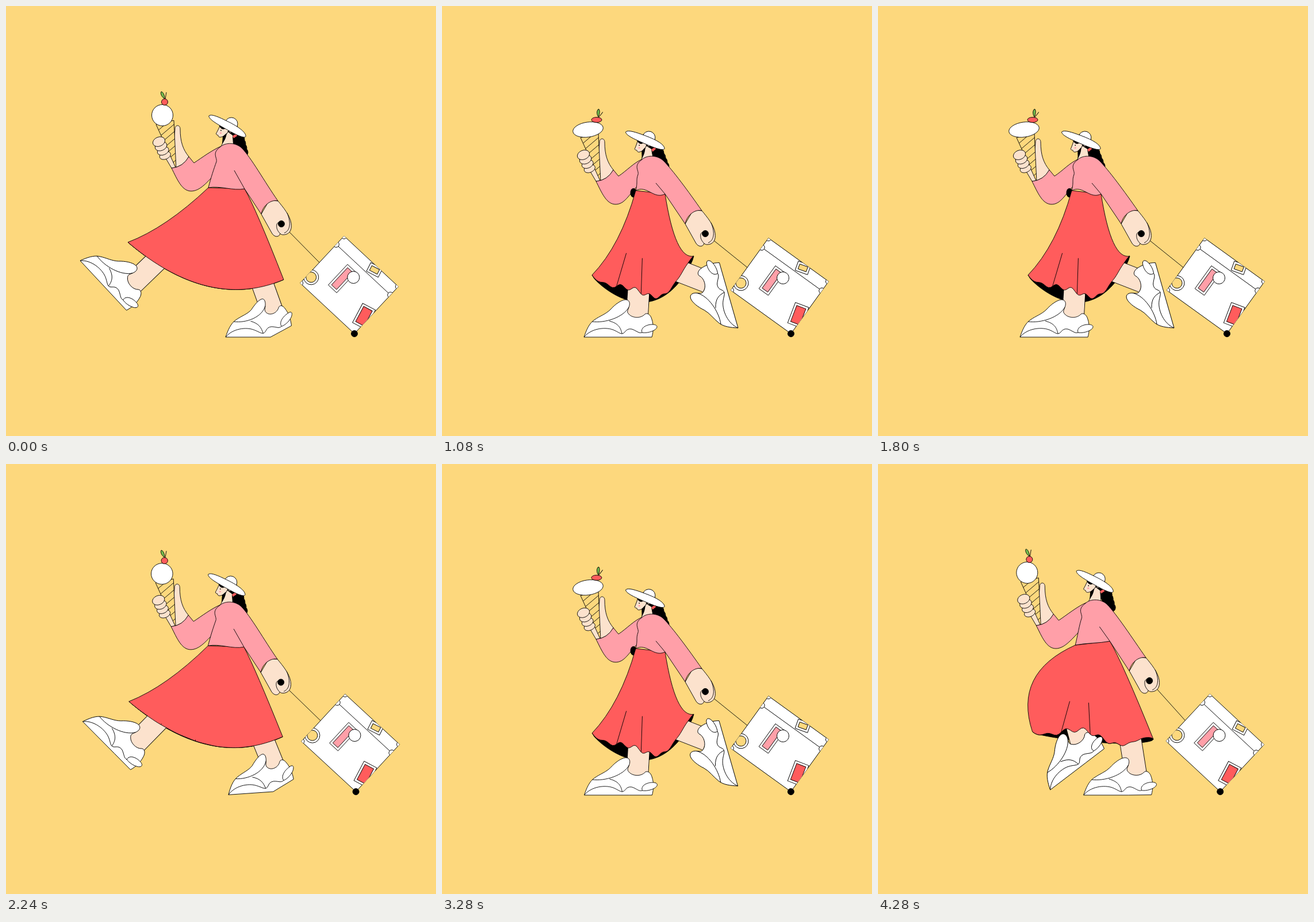
An HTML page with a canvas that plays this animation: 748 by 748 pixels, repeating every 4320 ms.

```html
<!DOCTYPE html>
<html lang="en">
<head>
<meta charset="utf-8">
<title>Walk with a suitcase</title>
<style>
html, body { margin: 0; width: 100%; height: 100%; overflow: hidden; background: #fdd87d; }
canvas { display: block; width: 100vw; height: 100vh; }
</style>
</head>
<body>
<canvas id="stage" width="748" height="748"></canvas>
<script>
const ctx = document.getElementById('stage').getContext('2d');
const YELLOW = '#fdd87d', PINK = '#ff9fa8', RED = '#ff5c5c', SKIN = '#fce2cd',
      WHITE = '#fff', BLACK = '#000', GREEN = '#74bf4d';
const LOOP = 4320, FRAME = 40, STEP = 18, LINE = 0.9;

// Four poses of one step. Body parts hold offsets from the contact pose,
// feet hold toe x, toe y, angle and heel bend.
const contact = {
  head: [0, 0], chest: [0, 0], cup: [0, 0], hand: [0, 0], caseX: 0, tilt: 0, squash: 0,
  waist: [[352, 316], [415, 318]], sides: [[278, 386], [435, 353]],
  hem: [[212, 411], [353, 531], [483, 476]], ripple: 0, phase: 0.65, depth: 0,
  lead: [129, 443, 47, 0], trail: [382, 576, 0, 20]
};
const down = {
  head: [-29, 24], chest: [-25, 22], cup: [-20, 23], hand: [-21, 17], caseX: 1, tilt: -7.2, squash: 1,
  waist: [[337, 321], [388, 327]], sides: [[311, 416], [406, 442]],
  hem: [[261, 468], [372, 551], [438, 435]], ripple: 11, phase: 0.65, depth: 13,
  lead: [247, 576, 0, 0], trail: [515, 560, -106, 0]
};
const pass = {
  head: [-25, -3], chest: [-16, -3], cup: [-21, -1], hand: [-16, 0], caseX: -16, tilt: 0, squash: 0,
  waist: [[341, 320], [396, 313]], sides: [[252, 414], [414, 360]],
  hem: [[284, 485], [365, 480], [445, 487]], ripple: 21, phase: 0.2, depth: 25,
  lead: [313, 576, 0, 0], trail: [443, 566, -109, 0]
};
const up = {
  head: [-8, -5], chest: [-12, -3], cup: [-13, -1], hand: [-7, -2], caseX: -11, tilt: 0, squash: 0,
  waist: [[343, 315], [403, 308]], sides: [[234, 363], [425, 345]],
  hem: [[270, 467], [400, 478], [479, 479]], ripple: 12, phase: -0.05, depth: 9,
  lead: [357, 576, 0, 0], trail: [304, 570, -39.5, 0]
};
const swapped = { ...contact, lead: contact.trail, trail: contact.lead };
const beats = [[0, contact], [9, down], [10, down], [14, pass], [17, up], [18, swapped]];

function mix(a, b, t) {
  if (typeof a === 'number') return a + (b - a) * t;
  if (Array.isArray(a)) return a.map((v, i) => mix(v, b[i], t));
  return Object.fromEntries(Object.keys(a).map(k => [k, mix(a[k], b[k], t)]));
}

function poseAt(q) {
  const i = beats.findIndex(([at], j) => j && q <= at);
  const [from, a] = beats[i - 1], [to, b] = beats[i];
  const t = (q - from) / (to - from);
  const falling = a === contact;
  const pose = mix(a, b, falling ? t ** 2.2 : t);
  if (falling) pose.caseX += 4 * Math.sin(Math.PI * t);
  return pose;
}

const rad = deg => deg * Math.PI / 180;

function turn(x, y, deg) {
  const c = Math.cos(rad(deg)), s = Math.sin(rad(deg));
  return [x * c - y * s, x * s + y * c];
}

function draw(d, fill, line = BLACK, width = LINE) {
  const path = new Path2D(d);
  if (fill) { ctx.fillStyle = fill; ctx.fill(path); }
  if (line) { ctx.strokeStyle = line; ctx.lineWidth = width; ctx.stroke(path); }
}

function oval(x, y, rx, ry, fill, deg = 0, line = BLACK) {
  const path = new Path2D();
  path.ellipse(x, y, rx, ry, rad(deg), 0, 2 * Math.PI);
  draw(path, fill, line);
}

function group([x, y], deg, paint) {
  ctx.save();
  ctx.translate(x, y);
  ctx.rotate(rad(deg));
  paint();
  ctx.restore();
}

function clipped(d, paint) {
  ctx.save();
  ctx.clip(new Path2D(d));
  paint();
  ctx.restore();
}

const rect = (x, y, w, h) => `M${x} ${y}h${w}v${h}h${-w}Z`;

// Lifts the heel end of the shoe; the front of the sole stays flat.
function bendPoint(x, y, bend) {
  const w = y === 0 && x <= 78 ? 0 : Math.max(0, (x - 40) / 78);
  const [u, v] = turn(x - 60, y, -bend * w);
  return [60 + u, v];
}

const shoe = {
  body: 'M0 0 C4 -12 9 -24 18 -30 C28 -37 38 -40 46 -48 C54 -57 64 -64 71 -65 C79 -66 81 -59 78 -52 C76 -46 74 -44 78 -40 C84 -33 99 -32 106 -40 C110 -43 116 -39 118 -31 C121 -22 121 -10 118 0 L78 0 Z',
  tongue: 'M14 -27 C36 -24 68 -34 78 -52',
  side: 'M44 -28 C60 -24 64 -16 66 -6',
  wave: 'M0 0 C12 -15 36 -18 50 -13 C58 -10 62 -6 66 -6 C72 -6 72 -16 83 -14 C92 -11 95 -6 101 -8',
  tab: 'M101 -8 C98 -16 108 -22 119 -22 C129 -22 129 -16 122 -12 C115 -8 106 -7 101 -8 Z'
};

// The shin leaves the shoe halfway between the shoe's own upright and the hip.
function leg([x, y, deg, bend], hip) {
  const [ax, ay] = turn(...bendPoint(92, -30, bend), deg);
  const ankle = [x + ax, y + ay];
  const toHip = Math.atan2(hip[1] - ankle[1], hip[0] - ankle[0]);
  const upright = turn(0, -1, deg - bend);
  const lean = Math.atan2(upright[1] + Math.sin(toHip), upright[0] + Math.cos(toHip));
  const shin = `M${ankle} L${ankle[0] + 80 * Math.cos(lean)} ${ankle[1] + 80 * Math.sin(lean)}`;
  draw(shin, null, BLACK, 38 + LINE);
  draw(shin, null, SKIN, 38 - LINE);
  group([x, y], deg, () => {
    for (const part in shoe) {
      const d = shoe[part].replace(/(-?\d+) (-?\d+)/g, (_, u, v) => bendPoint(+u, +v, bend).join(' '));
      draw(d, d.endsWith('Z') && WHITE);
    }
  });
}

function sticker(x, y, w, h, deg, fill) {
  group([x, y], deg, () => {
    draw(rect(-w / 2, -h / 2, w, h), WHITE);
    draw(rect(4 - w / 2, 4 - h / 2, w - 8, h - 8), fill);
  });
}

function suitcase({ caseX, tilt, hand }) {
  const w = 112, h = 129, deg = tilt - 47, wheel = [606 + caseX, 570];
  const [gx, gy] = turn(49, -h, deg);
  draw(`M${479 + hand[0]} ${379 + hand[1]} L${wheel[0] + gx} ${wheel[1] + gy}`);
  group(wheel, deg, () => {
    const box = rect(0, -h, w, h);
    draw(box, WHITE);
    clipped(box, () => {
      draw(`M92 ${-h}V0`);
      for (const x of [0, 92, w]) for (const y of [-h, 0]) if (x || y) oval(x, y, 5, 5, WHITE);
      oval(20.5, -122, 13, 13, WHITE);
      oval(20.5, -122, 9, 9, YELLOW);
      sticker(55.5, -81, 49, 20, 0, PINK);
      sticker(105, -50, 17, 23, -16, YELLOW);
      sticker(33.5, -8.5, 38, 25, -15, RED);
    });
    oval(70.5, -68, 10.5, 10.5, WHITE);
    oval(0, 0, 5.5, 5.5, BLACK);
  });
}

function hemPoint({ hem: [a, c, b], ripple, phase }, t) {
  const curve = i => mix(mix(a[i], c[i], t), mix(c[i], b[i], t), t);
  const wave = Math.cos(2.8 * Math.PI * (t - phase)) * Math.sqrt(Math.sin(Math.PI * t));
  const pleat = 0.5 * Math.sin(15 * Math.PI * t) * t * (1 - t) ** 2 * 5;
  return [curve(0), curve(1) + ripple * (wave + pleat)];
}

function hemLine(pose, drop = 0) {
  const points = [];
  for (let i = 0; i <= 60; i++) {
    const t = i / 60, [x, y] = hemPoint(pose, t);
    points.push([x, y + drop * Math.sqrt(4 * t * (1 - t))]);
  }
  return points.join('L');
}

function lining(pose) {
  const flat = { ...pose, ripple: 0 };
  draw(`M${hemLine(flat, pose.depth)}L${hemLine(pose).split('L').reverse().join('L')}Z`, BLACK);
}

function skirt(pose) {
  const { waist: [l, r], sides, hem, ripple } = pose;
  draw(`M${l}Q${sides[0]} ${hem[0]}L${hemLine(pose)}Q${sides[1]} ${r}Z`, RED);
  for (const t of [0.2, 0.42]) {
    const foot = hemPoint(pose, t);
    draw(`M${foot}L${mix(foot, mix(l, r, 0.3), 0.35 * Math.min(1, ripple / 11))}`);
  }
}

function iceCream(s) {
  draw('M294 214 C294 206 303 206 303 214 C303 236 308 250 318 262 C314 272 302 281 288 282 L275 260 L292 240 Z', SKIN);
  const cone = 'M261 206 L292 199 L296 283 Z';
  draw(cone, YELLOW);
  clipped(cone, () => {
    for (let y = 222; y < 310; y += 13) draw(`M258 ${y} l40 -34`);
  });
  oval(272 + 2 * s, 190 + 2 * s, 18.5 + 8 * s, 18.5 - 5.5 * s, WHITE, -8 * s);
  group([276 + 13 * s, 167 + 8 * s], 0, () => {
    oval(0, 0, 5.5 + 3.5 * s, 5.5 - s, RED);
    ctx.rotate(0.5 * s);
    draw('M0 -6 C-5 -8 -8 -15 -6 -18 C-3 -18 0 -12 0 -6 Z', GREEN);
    draw('M1 -5 L3 -17');
  });
  for (let i = 3; i >= 0; i--) oval(266 + 3.6 * i, 236 + 8 * i, 11 - i / 3, 8 - i / 2, SKIN, -22);
}

function ponytail(s) {
  for (let i = 0; i < 4; i++) oval(404 + (3 + s) * i, 232 + 7.5 * i, 11 - i, 11 - i, BLACK);
}

function head() {
  draw('M380 220 C380 232 377 239 372 248 L396 248 L394 218 Z', SKIN);
  draw('M373 206 C370 214 367 219 365.5 222 C366 225 369 224 369 225 C369 228 372 229 376 227.5 C382 226 385 222 386 218 L394 222 L396 208 Z', SKIN);
  draw('M377 227 L384 221 C383 230 379 236 376 240 Z', BLACK, null);
  draw('M371 204 C371 210 374 214 378 214 C381 214 383 211 385 213 L388 220 L396 226 L404 224 L402 208 Z', BLACK);
  oval(390.5, 217, 2.8, 3.3, SKIN);
  oval(374, 216.5, 0.9, 0.9, BLACK, 0, null);
  oval(373.5, 221, 1.7, 1.3, PINK, 0, null);
  draw('M394 226 L401 222 L402 226 L396 230 Z', RED, null);
  oval(392, 205, 11, 11, WHITE);
  draw('M353 191 C357 187 372 194 384 200 C401 208 418 219 417 227 C415 231 400 224 386 216 C370 207 352 197 353 191 Z', WHITE);
}

function farArm({ chest, cup }) {
  const c = (x, y) => `${x + chest[0]} ${y + chest[1]} `;
  const h = (x, y) => `${x + cup[0]} ${y + cup[1]} `;
  draw(`M${h(288, 282)}Q${h(308, 280)}${h(318, 262)}L${h(327, 273)}` +
    `C${h(342, 263)}${c(358, 251)}${c(374, 244)}L${c(385, 260)}L${c(366, 290)}` +
    `C${c(350, 306)}${h(338, 322)}${h(322, 322)}C${h(306, 322)}${h(298, 302)}${h(288, 282)}Z`, PINK);
}

function torso({ chest, hand, waist: [[lx, ly], [rx, ry]], squash }) {
  const c = (x, y) => `${x + chest[0]} ${y + chest[1]} `;
  const h = (x, y) => `${x + hand[0]} ${y + hand[1]} `;
  const wave = 4 + 6 * squash;
  draw(`M${lx} ${ly}C${lx + 4} ${ly - 16} ${c(362, 282)}${c(366, 271)}` +
    `C${c(368, 264)}${c(357, 256)}${c(373, 245)}C${c(380, 238)}${c(398, 236)}${c(410, 247)}` +
    `C${c(426, 263)}${h(450, 306)}${h(473, 339)}C${h(462, 336)}${h(447, 346)}${h(444, 362)}` +
    `L${rx} ${ry}C${rx - 20} ${ry + wave} ${lx + 20} ${ly - wave} ${lx} ${ly}Z`, PINK);
  draw(`M${rx} ${ry}L${c(397, 286)}`);
}

function nearHand() {
  draw('M473 339 C482 350 494 364 496 378 C498 391 492 398 482 398 C480 398 478 397 477 396 C475 402 468 403 463 396 L444 362 L458 338 Z', SKIN);
  draw('M489 360 C495 374 496 390 484 395 M477 396 C472 391 470 386 471 380 C472 376 476 376 479 379');
}

function render(ms) {
  const n = (ms % LOOP) / FRAME;
  const pose = poseAt(n % STEP);
  const { squash, waist } = pose;
  const hip = mix(waist[0], waist[1], 0.55);
  const feet = n % (2 * STEP) < STEP ? [pose.trail, pose.lead] : [pose.lead, pose.trail];

  ctx.fillStyle = YELLOW;
  ctx.fillRect(0, 0, 748, 748);
  ctx.lineJoin = 'round';

  suitcase(pose);
  lining(pose);
  feet.forEach(f => leg(f, hip));
  group(pose.cup, 0, () => iceCream(squash));
  farArm(pose);
  oval(waist[0][0] - 4, waist[0][1] + 4, 5.5 * squash, 8 * squash, BLACK, 0, null);
  skirt(pose);
  group(pose.head, 0, () => ponytail(squash));
  group([390 + pose.head[0], 235 + pose.head[1]], -6 * squash, () => {
    ctx.translate(-390, -235);
    head();
  });
  group(pose.hand, 0, nearHand);
  torso(pose);
  oval(479 + pose.hand[0], 379 + pose.hand[1], 5.5, 5.5, BLACK);
}

function tick() {
  render(performance.now());
  requestAnimationFrame(tick);
}
tick();
</script>
</body>
</html>
```
